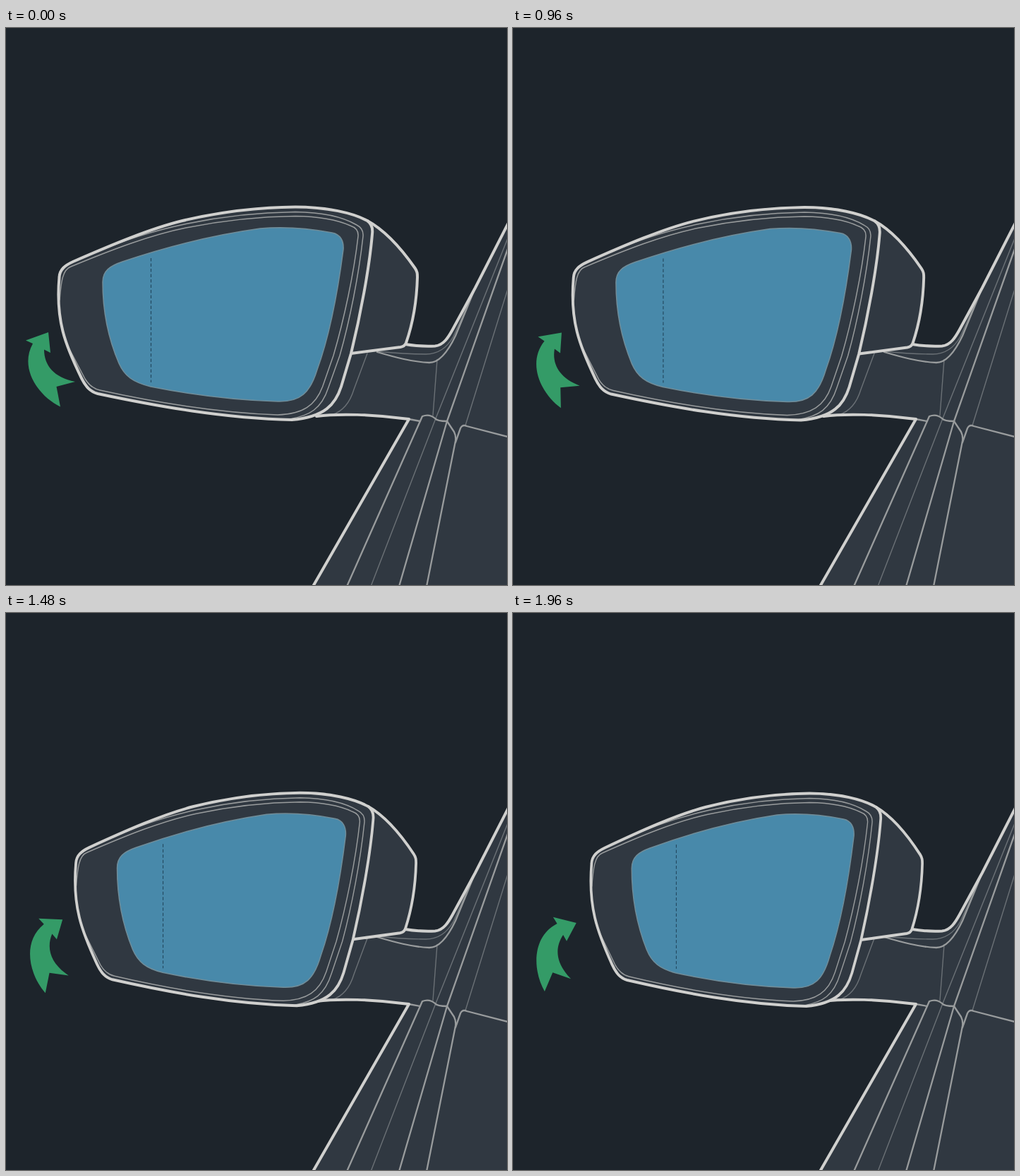
An HTML page for the animation above (2.52 s loop, 710 by 789 pixels).

```html
<!DOCTYPE html>
<html lang="en">
<head>
<meta charset="utf-8">
<title>Folding mirror</title>
<style>
  html, body { margin: 0; width: 100%; height: 100%; overflow: hidden; background: #1d242b; }
  svg { display: block; width: 100%; height: 100%; }
  path { stroke-linejoin: round; stroke-linecap: round; }
  .bold, .mid, .ring, .thin { fill: none; }
  .body { fill: #303841; }
  .bold { stroke: #d0d0ce; stroke-width: 4; }
  .mid { stroke: #999c9d; stroke-width: 2.3; }
  .ring { stroke: #999c9d; stroke-width: 1.5; }
  .thin { stroke: #6b7176; stroke-width: 1.4; }
  .glass { fill: #4889aa; stroke: #718d99; stroke-width: 1.5; }
  .dash { stroke: #244a60; stroke-width: 1.2; stroke-dasharray: 4.5 3; stroke-linecap: butt; }
  .arrow { fill: #349b67; }
</style>
</head>
<body>
<svg viewBox="0 0 710 789">
  <defs>
    <path id="rim" d="M512 273C518 277 520 284 519 292C515 340 502 408 489 461L475 508C467 533 452 551 405 555C310 553 215 536 130 518C119 515 113 508 107 496C84 449 70 414 75.5 353C76 342 84 336 95 331C150 307 205 284 250 273C305 260 360 254 410 253.5C455 253.5 492 262 512 273Z"/>
  </defs>
  <g id="car">
    <path class="body" d="M566 448C580 450.5 596 451 608 450.5C620 449.5 627 438 633 427L665 368L712 276V791H435L571 554C520 547 470 546 440 550L489 455Z"/>
    <path class="thin" d="M512 461L493 512C487 532 477 543 462 548"/>
    <path class="thin" d="M526 458C555 461 580 462 595 462C613 462 625 453 634 437L665 368"/>
    <path class="thin" d="M611 470L605 549"/>
    <path class="thin" d="M711 298L609 553L517 791"/>
    <path class="thin" d="M711 370L651 563"/>
    <path class="mid" d="M526 459C550 466 575 473 600 474C615 474 627 457 637 436L665 368"/>
    <path class="mid" d="M711 313L625 557L557 791"/>
    <path class="mid" d="M571 554L587 557"/>
    <path class="mid" d="M483 791L590 550Q600 546 608 553Q611 557 625 557L635 572Q638 578 637 585L596 791"/>
    <path class="mid" d="M637 587L644 567Q647 561 653 564L711 579"/>
    <path class="bold" d="M566 448C580 450.5 596 451 608 450.5C620 449.5 627 438 633 427L665 368L712 276"/>
    <path class="bold" d="M440 550C470 546 520 547 571 554L435 791"/>
  </g>
  <g id="mirror">
    <path class="body bold" style="fill:#303841" d="M512 273C538 287 562 315 579.5 340C583 345 583 348 583 353C582 390 576 420 567 446Q565 451 559 452L489 461"/>
    <use href="#rim" class="body"/>
    <path class="ring" d="M130 317C170 299 215 286 255 277.5C310 266 365 261 410 260.5C455 261 480 269 497 279Q507 284 506 295C500 350 487 415 473 464L457 509C447 540 430 549 402 554"/>
    <path class="ring" d="M76 385C78 360 80 342 92 338C150 314 205 293 255 283C310 272 365 267 410 266.5C448 267 470 272 488 280Q500 284 499 295C493 348 479 413 464 464L449 507C439 535 420 547 385 548C300 545 215 531 133 513Q120 510 112 497L90 455"/>
    <use href="#rim" class="bold"/>
    <path class="glass" d="M137 360C137 344 147 337 165 331C230 309 295 293 360 284C395 281 430 284 462 290C474 292 479 302 478 314C471 368 459 435 441 484C431 517 417 530 385 529C320 527 260 519 205 508C180 502 168 493 160 475C145 440 137 400 137 360Z"/>
    <path class="dash" d="M205.5 326V502"/>
  </g>
  <path id="arrow" class="arrow" d="M28 442.5L60 431L63 460L54 455.5C54 478 68 495 98 501L71.5 508L77 536.5C47 522 18 483 38 447Z"/>
</svg>
<script>
  const LOOP = 2520, STEP = 40, START = 14, STEPS = 35;
  const mirror = document.getElementById('mirror');
  const arrow = document.getElementById('arrow');
  const began = performance.now();

  function draw(ms) {
    const p = Math.min(1, Math.max(0, (Math.floor(ms / STEP) - START) / STEPS));
    // Folding is a horizontal squeeze towards the hinge.
    const squeeze = 1 - 0.0764 * p;
    mirror.setAttribute('transform',
      `translate(545 ${2 * p}) scale(${squeeze} 1) translate(-545 0)`);
    arrow.setAttribute('transform',
      `translate(${-0.7 * p} ${-0.4 * p}) rotate(${34 * p} 61.5 485)`);
  }

  function tick() {
    draw((performance.now() - began) % LOOP);
    requestAnimationFrame(tick);
  }
  tick();
</script>
</body>
</html>
```
